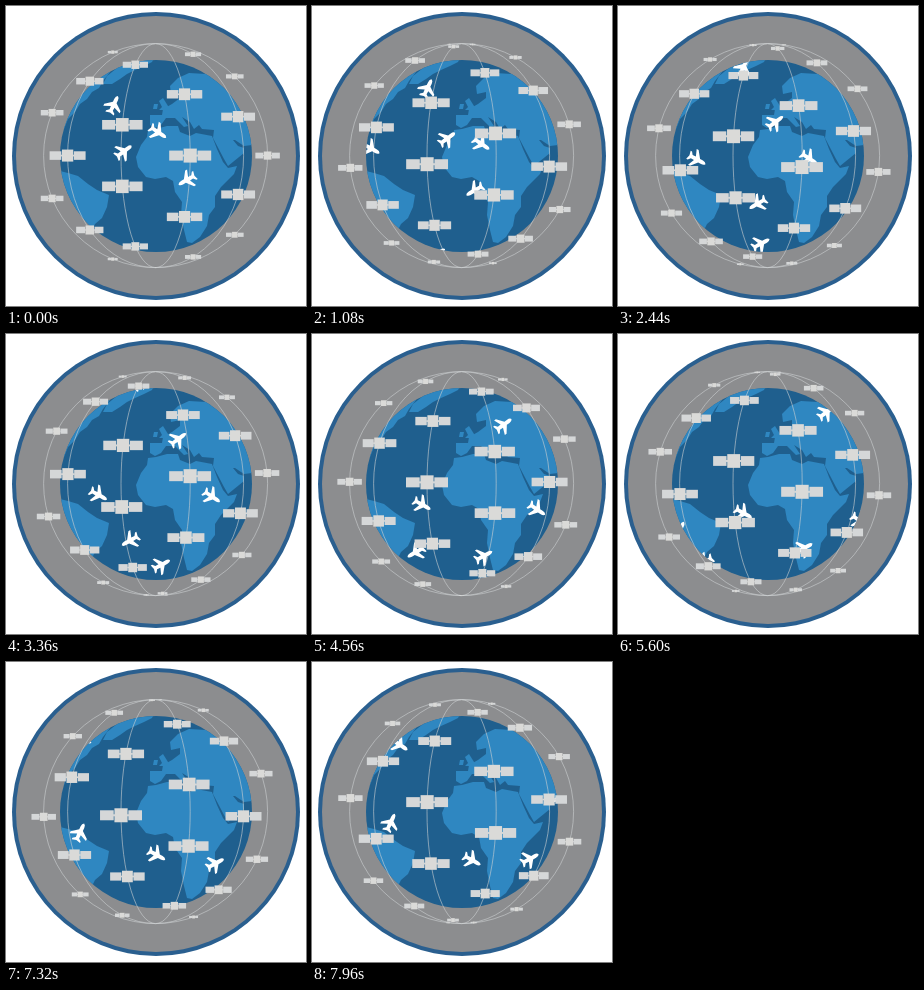
Animation of 300 by 300 pixels, one loop 8 s. Source, as an HTML page with a canvas:

```html
<!DOCTYPE html>
<html lang="en">
<head>
<meta charset="utf-8">
<title>Satellites and aircraft</title>
<style>
  html, body { margin: 0; height: 100%; overflow: hidden; background: #fff; }
  canvas { display: block; width: 100vw; height: 100vh; }
</style>
</head>
<body>
<canvas id="stage" width="300" height="300"></canvas>
<script>
const ctx = document.getElementById('stage').getContext('2d');
const LOOP = 8000, PLANE_CYCLE = 12, SPACING_TIME = 3;
const CENTER = 150, EARTH_RADIUS = 96;
const ORBIT_CENTER = 149.6, ORBIT_HEIGHT = 112;

const LAND = '#2f87c1', OCEAN = '#1f5f8e';

const land = new Path2D(
  // North America and Greenland
  'M50 127L58 123L62 113L69 106L74 98L81 93L86 86L93 82L97 75L104 66L80 60L50 100Z' +
  'M97 78L101 70L116 58L132 50L148 52L146 56L138 60L129 64L121 68L114 73L106 78Z' +
  // South America
  'M50 164L62 167L72 170L82 178L91 184L103 189L101 201L96 212L89 218L84 228L79 238L50 215Z' +
  // Africa
  'M142 124L150 123L161 120L172 120L174 126L184 130L190 127L206 130L211 143L217 156L222 162L231 160L228 168L215 181L209 190L209 201L203 209L201 220L194 231L186 237L181 236L178 224L175 209L176 196L169 186L167 175L160 171L149 173L140 171L132 161L130 151L135 139L141 131Z' +
  // Europe and Asia
  'M144 119L144 109L156 109L157 103L166 98L174 92L174 86L165 88L164 80L172 72L183 67L200 68L215 60L255 100L255 148L246 139L238 140L229 134L227 134L232 140L238 142L238 147L222 160L218 153L207 132L208 124L196 123L193 119L188 123L184 116L176 111L182 120L178 121L169 112L160 112L155 119L149 122Z' +
  // British Isles
  'M153 104L156 101L153 95L157 92L162 100L161 104ZM147 103L148 98L152 98L151 103Z'
);
const planeShape = new Path2D(
  'M9.5 0Q8.5 -2 5.5 -2L2.2 -2L-3.3 -9L-5.5 -9L-2.6 -2L-6.2 -1.8L-8.4 -4.6L-10 -4.6L-8.8 0' +
  'L-10 4.6L-8.4 4.6L-6.2 1.8L-2.6 2L-5.5 9L-3.3 9L2.2 2L5.5 2Q8.5 2 9.5 0Z'
);

// Position at time zero and velocity in pixels per second
const planes = [
  { x: 107.8, y: 98.5, vx: 7.2, vy: -15.3 },
  { x: 152.3, y: 126.3, vx: 16, vy: 10.8 },
  { x: 118, y: 145.3, vx: 16.2, vy: -12 },
  { x: 180.8, y: 174, vx: -16.9, vy: 9.7 },
  { x: 43.3, y: 133.8, vx: 14.7, vy: 8.1 },
  { x: 110, y: 255.6, vx: 13.6, vy: -7.4 }
];

const orbits = [
  { rx: 112, size: 24.5 },
  { rx: 88, size: 36 },
  { rx: 34.6, size: 42 }
].map(orbit => ({ ...orbit, angleAt: arcLengthAngle(orbit.rx) }));

// Maps a share of the half ellipse's length to its angle, bottom pole to top pole
function arcLengthAngle(rx) {
  const steps = 400, lengths = [0], delta = Math.PI / steps;
  for (let i = 0; i < steps; i++) {
    const a = -Math.PI / 2 + (i + 0.5) * delta;
    lengths.push(lengths[i] + Math.hypot(rx * Math.sin(a), ORBIT_HEIGHT * Math.cos(a)) * delta);
  }
  return share => {
    const goal = share * lengths[steps];
    let i = 1;
    while (i < steps && lengths[i] < goal) i++;
    const part = (goal - lengths[i - 1]) / (lengths[i] - lengths[i - 1]);
    return -Math.PI / 2 + (i - 1 + part) * delta;
  };
}

function disc(radius, color) {
  ctx.fillStyle = color;
  ctx.beginPath();
  ctx.arc(CENTER, CENTER, radius, 0, 2 * Math.PI);
  ctx.fill();
}

function drawPlane({ x, y, vx, vy }, t) {
  ctx.save();
  ctx.translate(x + vx * t, y + vy * t);
  ctx.rotate(Math.atan2(vy, vx));
  ctx.fillStyle = '#fff';
  ctx.fill(planeShape);
  ctx.restore();
}

function drawSatellite(x, y, width) {
  ctx.save();
  ctx.translate(x, y);
  ctx.scale(width / 42, width / 42);
  ctx.fillStyle = '#d5d7d8';
  ctx.fillRect(-21, -5, 13.7, 10);
  ctx.fillRect(7.3, -5, 13.7, 10);
  ctx.fillRect(-8, -1, 16, 2);
  ctx.fillStyle = '#dadad8';
  ctx.fillRect(-6.6, -7, 13.2, 14);
  ctx.restore();
}

function drawSatellites({ rx, size, angleAt }, side, phase, t) {
  const shift = (phase + t / SPACING_TIME) % 1;
  for (let k = 0; k < 4; k++) {
    const angle = angleAt((k + shift) / 4);
    const depth = Math.cos(angle);
    drawSatellite(ORBIT_CENTER + side * rx * depth, ORBIT_CENTER - ORBIT_HEIGHT * Math.sin(angle),
      size * (0.04 + 0.96 * depth));
  }
}

function drawEarth() {
  ctx.save();
  disc(EARTH_RADIUS, OCEAN);
  ctx.clip();
  ctx.fillStyle = LAND;
  ctx.fill(land);
  ctx.restore();
}

function drawPlanes(t) {
  ctx.save();
  ctx.beginPath();
  ctx.arc(CENTER, CENTER, EARTH_RADIUS, 0, 2 * Math.PI);
  ctx.clip();
  for (const plane of planes) {
    drawPlane(plane, t);
    drawPlane(plane, t - PLANE_CYCLE);
  }
  ctx.restore();
}

function drawOrbits() {
  ctx.strokeStyle = 'rgba(205, 208, 210, 0.6)';
  ctx.lineWidth = 1;
  for (const { rx } of orbits) {
    ctx.beginPath();
    ctx.ellipse(ORBIT_CENTER, ORBIT_CENTER, rx, ORBIT_HEIGHT, 0, 0, 2 * Math.PI);
    ctx.stroke();
  }
}

function draw(now) {
  const t = (now % LOOP) / 1000;
  ctx.clearRect(0, 0, 300, 300);
  disc(144, '#2a5f8f');
  disc(140, '#8c8d8f');
  drawEarth();
  drawOrbits();
  drawPlanes(t);
  orbits.forEach((orbit, i) => {
    const leftPhase = i === 1 ? 0 : 0.5;
    drawSatellites(orbit, -1, leftPhase, t);
    drawSatellites(orbit, 1, 0.5 - leftPhase, t);
  });
}

const start = performance.now();
function tick() {
  draw(performance.now() - start);
  requestAnimationFrame(tick);
}
tick();
</script>
</body>
</html>
```
